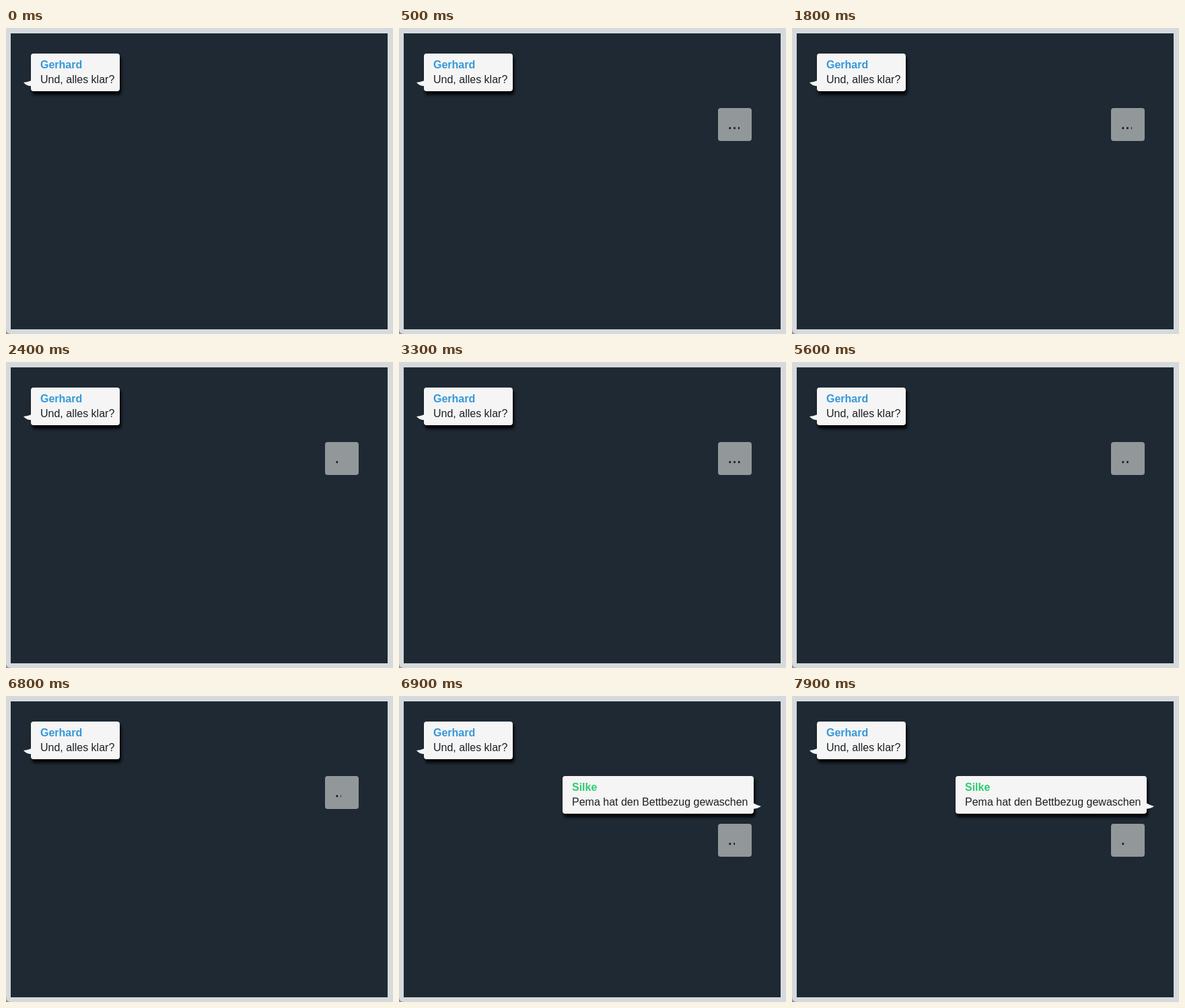
An HTML page that plays this animation: 575 px wide and 455 px high, repeating every 8 s.

```html
<!DOCTYPE html>
<html lang="de">
<head>
<meta charset="utf-8">
<title>Chat</title>
<style>
  html, body { margin: 0; width: 100%; height: 100%; overflow: hidden; background: #8d9193; }
  svg { display: block; }
  text { font: 16px "Liberation Sans", Arial, sans-serif; fill: #1c1f22; }
  .name { font-weight: bold; }
  .card, .tail { fill: #f5f5f5; }
  .card { filter: url(#shadow); }
  .dots { font-size: 21px; fill: #0d1216; stroke: #0d1216; stroke-width: .5px; }
</style>
</head>
<body>
<svg width="575" height="455" viewBox="0 0 575 455">
  <defs>
    <filter id="shadow" x="-20%" y="-30%" width="140%" height="170%" color-interpolation-filters="sRGB">
      <feDropShadow dx="2" dy="5" stdDeviation="2" flood-color="#000"/>
    </filter>
    <clipPath id="reveal"><rect id="window" x="480" y="119" width="0" height="49"/></clipPath>
  </defs>

  <path d="M0 0H575V455H8Q0 455 0 447Z" fill="#d6dadc"/>
  <rect x="7" y="8" width="560" height="440" fill="#1e2933"/>

  <g>
    <rect class="card" x="37" y="38" width="132" height="56" rx="4"/>
    <path class="tail" d="M38 78Q32 80.5 26 81Q30 86 38 86.5Z"/>
    <text class="name" x="51" y="60" style="fill:#3498db">Gerhard</text>
    <text x="51" y="82">Und, alles klar?</text>
  </g>

  <g id="reply">
    <rect class="card" x="243" y="119" width="284" height="56" rx="4"/>
    <path class="tail" d="M526 159Q532 162.5 538 164Q533 167.5 526 168Z"/>
    <text class="name" x="257" y="141" style="fill:#2ecc71">Silke</text>
    <text x="257" y="163">Pema hat den Bettbezug gewaschen</text>
  </g>

  <g id="typing">
    <rect x="474" y="119" width="50" height="49" rx="4" fill="#92979a"/>
    <g clip-path="url(#reveal)"><text class="dots" x="488" y="150">…</text></g>
  </g>
</svg>
<script>
  const LOOP = 8000, TYPING_AT = 200, REPLY_AT = 6900;
  const CYCLE = 1365, FIRST_RESET = 655, SPEED = 0.016; // ms, ms, px per ms

  const get = id => document.getElementById(id);
  const reply = get('reply'), typing = get('typing'), slit = get('window');
  const show = (el, on) => el.setAttribute('visibility', on ? 'visible' : 'hidden');

  function draw() {
    const t = performance.now() % LOOP;
    const replied = t >= REPLY_AT;
    show(reply, replied);
    show(typing, t >= TYPING_AT);
    typing.setAttribute('transform', `translate(0 ${replied ? 71 : 0})`);

    // the dots are uncovered from the left, then hidden at once
    const phase = (t - FIRST_RESET + CYCLE) % CYCLE;
    slit.setAttribute('width', Math.round(6.8 + phase * SPEED));
    requestAnimationFrame(draw);
  }
  draw();
</script>
</body>
</html>
```
